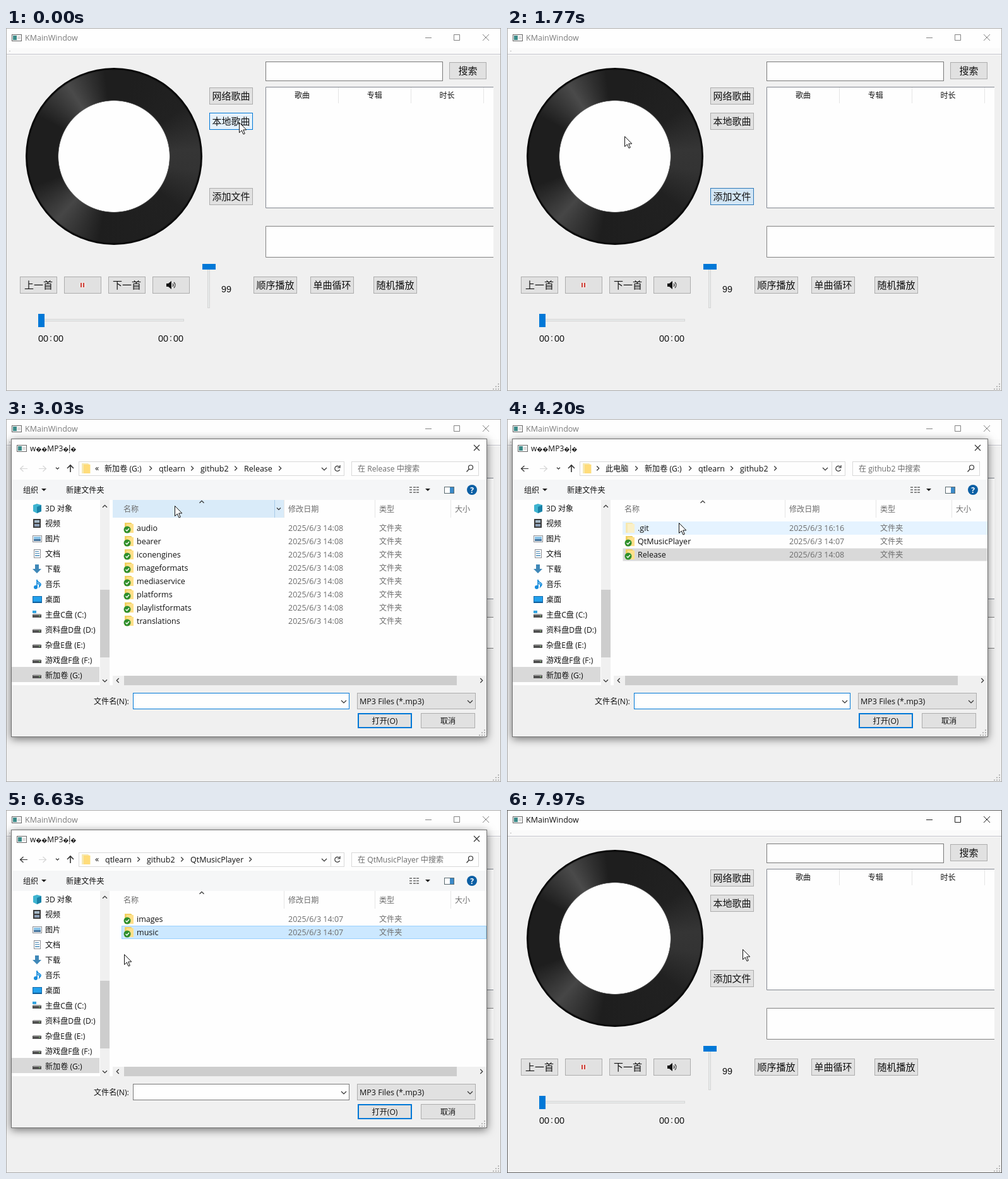
Write an HTML page that moves like this. It is 784 px wide and 574 px high and loops after 8000 ms.

```html
<!DOCTYPE html>
<html lang="zh">
<head>
<meta charset="utf-8">
<title>KMainWindow</title>
<style>
html, body { margin: 0; width: 100%; height: 100%; overflow: hidden; background: #f0f0f0; }
svg { display: block; width: 100vw; height: 100vh; }
text { font-family: "Open Sans", "Noto Sans CJK SC", "Noto Sans CJK", sans-serif; fill: #111; white-space: pre; }
.qt { font-family: "Noto Sans CJK SC", "Noto Sans CJK", sans-serif; font-size: 15px; }
.digits { font-family: "Liberation Sans", sans-serif; font-size: 14.4px; }
.head { font-weight: 500; font-size: 12px; }
.dim { fill: #6d6d6d; }
.mid { text-anchor: middle; }
.btn { fill: #e1e1e1; stroke: #adadad; }
.line { fill: none; stroke: #333; stroke-width: 1.2; }
.record {
  width: 280px; height: 280px; border-radius: 50%;
  background:
    radial-gradient(circle, #fefefe 0 87.5px, #777 88px, transparent 89px 136px, #080808 138px),
    conic-gradient(#1e1e1e 0 12deg, #212121 55deg, #353535 85deg, #333 100deg, #212121 128deg,
      #1e1e1e 190deg, #464646 222deg, #1e1e1e 250deg, #1e1e1e 298deg, #4a4a4a 327deg, #1e1e1e 354deg);
}
</style>
</head>
<body>
<script>
const LOOP = 8000;
const FACE = '#f0f0f0', BUTTON = '#e1e1e1', EDGE = '#adadad', WHITE = '#fefefe', BLUE = '#0078d7';

const text = (x, y, s, cls = '', size = /[\u4e00-\u9fff]/.test(s) ? 12.1 : 12.5) =>
  `<text x="${x}" y="${y + 4.5}" class="${cls}" font-size="${size}">${s}</text>`;
const box = (x, y, w, h, fill, stroke = 'none', extra = '') =>
  `<rect x="${x}" y="${y}" width="${w}" height="${h}" fill="${fill}" stroke="${stroke}" ${extra}/>`;
const frame = (x, y, w, h, fill, stroke, extra) => box(x + .5, y + .5, w - 1, h - 1, fill, stroke, extra);
const path = (d, attrs = 'class="line"') => `<path d="${d}" ${attrs}/>`;
const chevron = (x, y, dir, size = 3.5) => {
  const angle = { right: 0, down: 90, left: 180, up: 270 }[dir];
  return path(`M${-size / 2} ${-size}L${size / 2} 0L${-size / 2} ${size}`,
    `class="line" transform="translate(${x} ${y}) rotate(${angle})"`);
};
const triangle = (x, y) => path(`M${x - 4} ${y - 2}h8l-4 4z`, 'fill="#222"');
const button = (x, y, w, label = '', id = '') =>
  `<rect class="btn" ${id && `id="${id}"`} x="${x + .5}" y="${y + .5}" width="${w - 1}" height="26"/>` +
  `<text class="qt mid" x="${x + w / 2}" y="${y + 19}">${label}</text>`;
const clock = x => text(x, 491, '00', 'digits') + text(x + 18, 490, ':', 'digits') + text(x + 24, 491, '00', 'digits');
const appIcon = (x, y) => frame(x, y, 16, 11, WHITE, '#666') +
  box(x + 2, y + 2, 6, 7, '#3c8a88') + box(x + 9, y + 3, 5, 5, '#dcdcdc');
const grip = (x, y) => [[8, 0], [4, 4], [8, 4], [0, 8], [4, 8], [8, 8]]
  .map(([a, b]) => box(x + a, y + b, 2, 2, '#b8b8b8')).join('');

function mainWindow() {
  const headers = ['歌曲', '专辑', '时长'].map((s, i) =>
    text(469 + 114.7 * i, 106, s, 'head mid', 12) + box(526 + 115 * i, 94, 1, 25, '#e5e5e5')).join('');
  return box(0, 0, 784, 574, FACE) + box(1, 1, 782, 31, WHITE) + box(1, 32, 782, 10, '#fafafa') +
    box(1, 41, 782, 1, '#c0c0c8') + box(1, 42, 782, 1, WHITE) + box(5, 36, 2, 1, '#bbb') +
    frame(0, 0, 784, 574, 'none', '#aaa', 'id="border"') + appIcon(9, 10) +
    `<g id="caption">${text(30, 15, 'KMainWindow')}</g>` +
    `<g id="controls" stroke="#222" fill="none">${path('M664 15.5h10M709.5 10.5h9v9h-9zM755 10l10 10M765 10l-10 10', '')}</g>` +
    '<foreignObject x="31" y="63" width="280" height="280"><div class="record"></div></foreignObject>' +
    button(322, 94, 69, '网络歌曲') + button(322, 134, 69, '本地歌曲', 'local') +
    button(322, 253, 69, '添加文件', 'add') + button(702, 54, 59, '搜索') +
    frame(411, 53, 281, 31, WHITE, '#7a7a7a') +
    box(411, 93, 361, 192, WHITE) + path('M772 93.5H411.5V284.5H772', 'fill="none" stroke="#828790"') + headers +
    box(411, 313, 361, 50, WHITE) + path('M772 313.5H411.5V362.5H772', 'fill="none" stroke="#828282"') +
    button(22, 393, 59, '上一首') + button(92, 393, 59) + button(162, 393, 59, '下一首') + button(232, 393, 59) +
    '<circle cx="121.5" cy="406.5" r="6" fill="#ece4e2"/>' + box(118, 403, 2, 7, '#d0413a') + box(122, 403, 2, 7, '#d0413a') +
    path('M254 404h3l5-4v13l-5-4h-3z', 'fill="#111"') +
    path('M264 404q2 2.500 0 5M266 402q4 4.500 0 9') +
    button(392, 393, 69, '顺序播放') + button(482, 393, 69, '单曲循环') + button(582, 393, 69, '随机播放') +
    frame(319, 376, 4, 67, '#e7eaea', '#d6d6d6') + box(311, 373, 21, 9, BLUE) +
    frame(52, 460, 230, 4, '#e7eaea', '#d6d6d6') + box(51, 452, 10, 21, BLUE) +
    text(341, 413, '99', 'digits') + clock(51) + clock(241) + grip(771, 562);
}

// Icons for the sidebar places, each drawn in a 16 by 16 box.
const disk = box(1, 8, 14, 5, '#505050') + box(2, 7, 12, 2, '#a5a5a5') + box(11, 10, 2, 1, '#80d070');
const places = [
  ['3D 对象', path('M2 3l6-2 7 2v10l-7 3-6-3z', 'fill="#3fb4d0"') + path('M8 6l7-3v10l-7 3z', 'fill="#1982a8"')],
  ['视频', box(2, 1, 12, 14, '#3b3b3b') + box(4, 3, 8, 4, '#a6b9c8') + box(4, 9, 8, 4, '#8da0b8')],
  ['图片', frame(1, 3, 15, 11, WHITE, '#8d9096') + box(3, 5, 11, 4, '#8cc4e8') + box(3, 9, 11, 3, '#47749c')],
  ['文档', frame(3, 1, 11, 14, WHITE, '#8d9096') + box(5, 4, 6, 1, '#4686b4') + box(5, 7, 7, 1, '#4686b4') + box(5, 10, 7, 2, '#72a8cc')],
  ['下载', path('M5 1h6v7h4l-7 7-7-7h4z', 'fill="#3f88b8"')],
  ['音乐', '<circle cx="6" cy="13" r="3" fill="#168cdc"/>' + path('M8 13V1q0 3 4 5t0 6q1-4-3-5', 'fill="none" stroke="#168cdc" stroke-width="1.700"')],
  ['桌面', frame(1, 3, 15, 11, '#22a0ec', '#146cac') + box(2, 12, 13, 1, '#0f4f88')],
  ['主盘C盘 (C:)', disk + box(1, 2, 6, 4, '#32a4e0')],
  ['资料盘D盘 (D:)', disk], ['杂盘E盘 (E:)', disk], ['游戏盘F盘 (F:)', disk], ['新加卷 (G:)', disk],
];
const folder = (x, y, plain) =>
  path(`M${x} ${y}h10l2 2v14h-12z`, `fill="${plain ? '#f6e8b0' : '#f0d060'}"`) +
  box(x + 3, y + 2, 11, 14, plain ? '#faf0c8' : '#ffe08a') +
  (plain ? '' : `<circle cx="${x + 4}" cy="${y + 11}" r="5.500" fill="#2f8f2c"/>` +
    path(`M${x + 1.5} ${y + 11}l2 2 3.500-4`, 'fill="none" stroke="#fff" stroke-width="1.400"'));

// crumbs: label and x; tail: x of the closing arrow; rows: name and time.
const release = {
  lead: '«', crumbs: [['新加卷 (G:)', 156], ['qtlearn', 242], ['github2', 308], ['Release', 377]], tail: 434, name: 'Release',
  rows: ['audio', 'bearer', 'iconengines', 'imageformats', 'mediaservice', 'platforms', 'playlistformats', 'translations'].map(n => [n, '14:08']),
};
const repo = {
  lead: '›', crumbs: [['此电脑', 156], ['新加卷 (G:)', 218], ['qtlearn', 303], ['github2', 369]], tail: 425, name: 'github2',
  rows: [['.git', '16:16'], ['QtMusicPlayer', '14:07'], ['Release', '14:08']],
};
const player = {
  lead: '«', crumbs: [['qtlearn', 157], ['github2', 223], ['QtMusicPlayer', 292]], tail: 387, name: 'QtMusicPlayer',
  rows: [['images', '14:07'], ['music', '14:07']],
};
const music = { lead: '«', crumbs: [...player.crumbs, ['music', 400]], tail: 446, name: 'music', rows: [] };
const folders = [release, repo, player, music];

const folderView = (f, i) => `<g id="view${i}">` +
  (f.lead === '«' ? text(141, 77, '«') : chevron(144, 78, 'right')) +
  f.crumbs.map(([s, x], k) => text(x, 78, s) + (k ? chevron(x - 13, 78, 'right') : '')).join('') +
  chevron(f.tail, 78, 'right') + text(557, 78, `在 ${f.name} 中搜索`, 'dim') +
  f.rows.map(([name, time], k) => {
    const y = 172 + 21 * k;
    return folder(188, y - 8, name === '.git') + text(207, y, name) +
      text(447, y, '2025/6/3 ' + time, 'dim') + text(591, y, '文件夹', 'dim');
  }).join('') + '</g>';

function dialog() {
  const bad = '<tspan font-size="9">\ufffd</tspan>';
  const side = places.map(([label, icon], i) =>
    `<g transform="translate(41 ${133 + 24 * i})">${icon}</g>` + text(62, 141 + 24 * i, label)).join('');
  const columns = [['名称', 186], ['修改日期', 447], ['类型', 591], ['大小', 711]];
  return box(8, 31, 754, 472, WHITE, 'none', 'style="filter:drop-shadow(0 3px 7px #0008)"') +
    box(9, 96, 752, 32, '#f5f6f7') + box(9, 421, 752, 82, FACE) +
    frame(8, 31, 754, 472, 'none', '#707070') + appIcon(17, 41) +
    text(38, 46, `w${bad}${bad}MP3${bad}ļ${bad}`, '', 12) + path('M741 41l9 9M750 41l-9 9') +
    `<g id="back">${path('M34 78.500H23M27.500 74l-5 4.500 5 4.500')}</g>` +
    `<g opacity=".2">${path('M52 78.500H63M58.500 74l5 4.500-5 4.500')}</g>` +
    chevron(81.5, 78, 'down', 2.5) + path('M102 84V73M97 78l5-5 5 5', 'class="line" style="stroke-width:1.6"') +
    frame(115, 67, 421, 23, WHITE, '#d9d9d9') + box(514, 68, 1, 21, '#d9d9d9') + folder(120, 70, true) +
    box(123, 72, 10, 14, '#ffdc7a') + chevron(504, 79, 'down', 4) +
    path('M528 76a4 4 0 1 0 .5 4M529 73v4h-4') + frame(547, 67, 202, 23, WHITE, '#d9d9d9') +
    '<circle cx="736" cy="76.500" r="3.500" class="line"/>' + path('M733.500 79l-4 4.500') +
    text(27, 112, '组织') + triangle(60, 112) + text(95, 112, '新建文件夹') +
    [0, 1, 2].map(i => [0, 6, 11].map(x => box(639 + x, 107 + 4 * i, 4, 2, '#8a8a8a')).join('')).join('') +
    triangle(668, 112) + frame(694, 107, 16, 11, WHITE, '#5a6a70') + box(703, 108, 6, 9, '#3c8ac8') +
    '<circle cx="738" cy="112" r="8" fill="#0c5fa4"/>' +
    '<text x="738" y="116.500" class="mid" font-size="12" font-weight="700" style="fill:#fff">?</text>' +
    box(9, 392, 139, 24, '#d9d9d9') + side +
    box(149, 128, 15, 293, FACE) + box(149, 270, 15, 107, '#cdcdcd') +
    chevron(156.5, 138, 'up') + chevron(156.5, 414, 'down') +
    `<g id="headHover">${box(169, 128, 271, 28, '#d9ebf9')}${box(425, 128, 1, 28, '#a9cce8')}${chevron(432, 142, 'down', 3)}</g>` +
    columns.map(([s, x]) => text(x, 142, s, 'dim')).join('') +
    [440, 584, 704].map(x => box(x, 128, 1, 28, '#e5e5e5')).join('') + chevron(310, 131, 'up', 3.5) +
    frame(183, 162, 578, 21, WHITE, 'none', 'id="rowSelect"') + box(183, 162, 578, 21, '#e5f3ff', 'none', 'id="rowHover"') +
    folders.map(folderView).join('') +
    box(169, 406, 592, 15, FACE) + box(187, 406, 527, 15, '#cdcdcd') +
    chevron(177, 413.5, 'left') + chevron(753, 413.5, 'right') +
    text(139, 446, '文件名(N):') + frame(201, 433, 343, 26, WHITE, '#7a7a7a', 'id="fileName"') + chevron(535, 447, 'down', 4) +
    frame(556, 433, 188, 26, BUTTON, EDGE) + text(560, 446, 'MP3 Files (*.mp3)') + chevron(735, 447, 'down', 4) +
    box(558, 466, 84, 22, BUTTON, BLUE, 'stroke-width="2"') + text(600, 477, '打开(O)', 'mid') +
    frame(657, 465, 86, 24, BUTTON, EDGE) + text(700, 477, '取消', 'mid') + grip(749, 491);
}

document.body.innerHTML = `<svg viewBox="0 0 784 574" preserveAspectRatio="none">${mainWindow()}<g id="dialog">${dialog()}</g>` +
  `<g id="cursor">${path('M.5 .5V16.500L4.300 13 7 19l2.300-1L6.700 12H11.800z', 'fill="#fff" stroke="#111"')}</g></svg>`;
const $ = id => document.getElementById(id);

// time, x, y of the pointer
const pointer = [
  [0, 369, 149], [80, 369, 149], [520, 357, 267], [850, 357, 267], [1600, 186, 171], [2350, 186, 171], [2950, 267, 137],
  [3100, 267, 137], [3500, 101, 79], [3700, 101, 79], [4180, 272, 164], [4450, 262, 190], [4800, 262, 190], [5200, 249, 186],
  [5850, 249, 186], [6150, 101, 79], [6300, 101, 79], [6600, 187, 228], [6660, 187, 228], [6860, 230, 190], [7000, 230, 190],
  [7350, 373, 220], [LOOP, 373, 220],
];
// start, folder, selected row, selection has focus
const visits = [
  [0, release, -1], [3640, repo, 2, false], [4700, player, -1], [5500, music, -1],
  [6260, player, 1, true], [6980, music, -1],
];
const PRESS = 640, RELEASE = 780, OPEN = 2250, CLOSE = 7650, FADE = 130;
const clamp = v => Math.max(0, Math.min(1, v));

function pointerAt(t) {
  const i = pointer.findIndex(p => p[0] > t);
  const [t0, x0, y0] = pointer[i - 1], [t1, x1, y1] = pointer[i];
  const p = (t - t0) / (t1 - t0), e = p * p * (3 - 2 * p);
  return [x0 + (x1 - x0) * e, y0 + (y1 - y0) * e];
}
const show = (id, on) => { $(id).style.display = on ? '' : 'none'; };
function paint(id, fill, stroke) { Object.assign($(id).style, { fill, stroke }); }

function draw(t) {
  const [x, y] = pointerAt(t);
  $('cursor').setAttribute('transform', `translate(${Math.round(x)} ${Math.round(y)})`);

  const active = (t > PRESS && t < RELEASE) || t > CLOSE;
  $('caption').style.opacity = $('controls').style.opacity = active ? 1 : .55;
  $('border').style.stroke = active ? '#606060' : '#aaa';

  const isOpen = t >= OPEN && t < CLOSE + FADE;
  const look = (id, top, pressed) => {
    const over = !isOpen && x > 322 && x < 391 && y > top && y < top + 27;
    if (pressed) paint(id, '#d3e6f5', '#2c78b8');
    else if (over) paint(id, '#e5f1fb', BLUE);
    else paint(id, '', '');
  };
  look('local', 134, false);
  look('add', 253, t >= PRESS && t < CLOSE);

  show('dialog', isOpen);
  if (!isOpen) return;
  const fade = Math.min(clamp((t - OPEN + 30) / 180), clamp((CLOSE + FADE - t) / FADE));
  const scale = .92 + .08 * (1 - (1 - fade) ** 3);
  $('dialog').style.opacity = fade;
  $('dialog').setAttribute('transform', `translate(385 267) scale(${scale}) translate(-385 -267)`);

  const [, place, selected, focused] = visits.findLast(v => v[0] <= t);
  folders.forEach((f, i) => show('view' + i, f === place));
  $('back').style.opacity = place === release ? .2 : 1;
  paint('fileName', WHITE, place === release || place === repo ? BLUE : '#7a7a7a');
  show('headHover', x > 169 && x < 440 && y > 128 && y < 156);

  const row = Math.floor((y - 162) / 21);
  show('rowHover', x > 183 && row >= 0 && row < place.rows.length && row !== selected);
  $('rowHover').setAttribute('y', 162 + 21 * row);
  show('rowSelect', selected >= 0);
  $('rowSelect').setAttribute('y', 162.5 + 21 * selected);
  paint('rowSelect', focused ? '#cce8ff' : '#d9d9d9', focused ? '#99d1ff' : 'none');
}

const start = performance.now();
function tick() {
  draw((performance.now() - start) % LOOP);
  requestAnimationFrame(tick);
}
tick();
</script>
</body>
</html>
```
